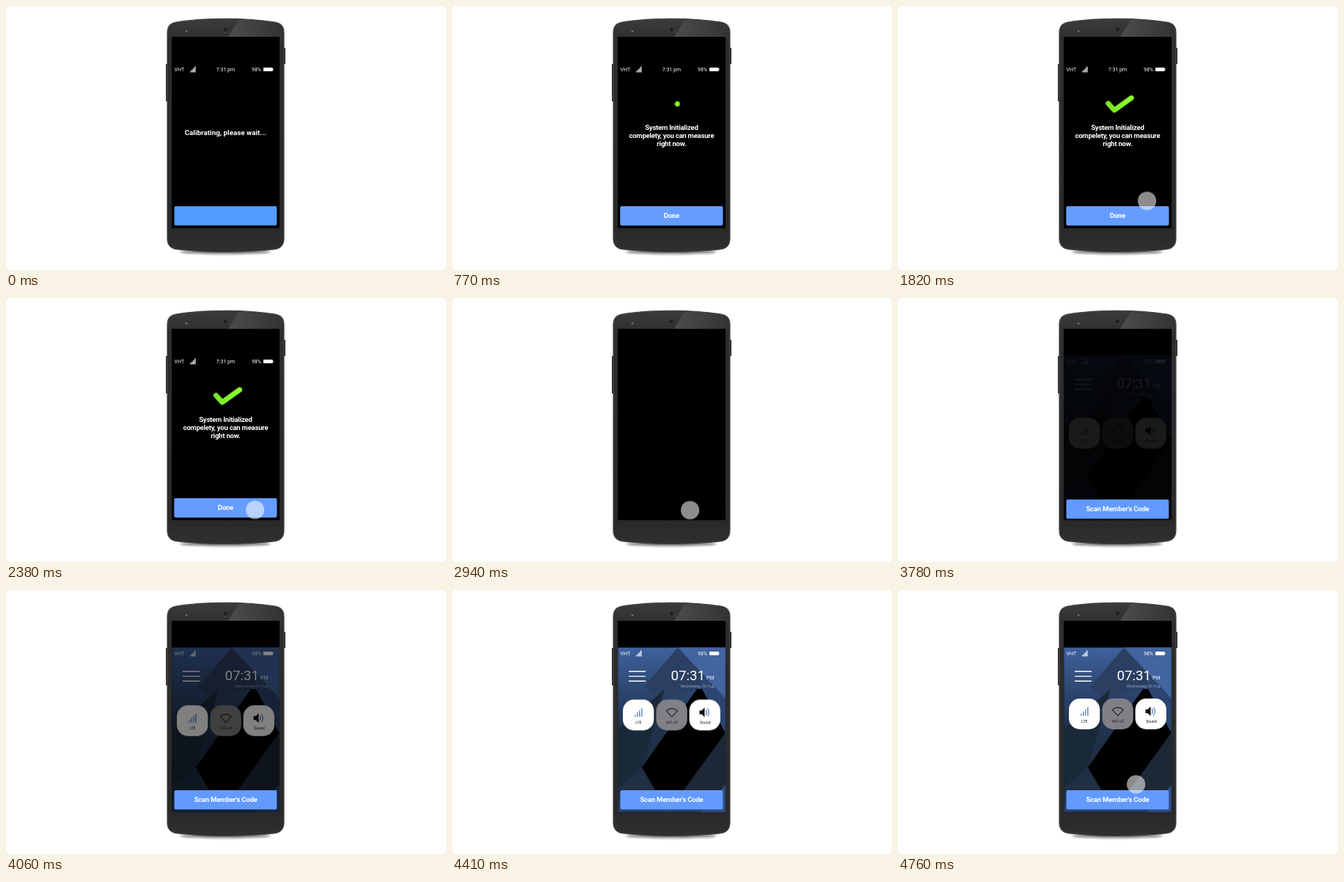
An HTML page that plays this animation: 600 px wide and 360 px high, repeating every 4830 ms.

```html
<!DOCTYPE html>
<html lang="en">
<head>
<meta charset="utf-8">
<title>Phone calibration</title>
<style>
  html, body { margin: 0; width: 100%; height: 100%; overflow: hidden; background: #ccc; }
  svg { display: block; width: 600px; height: 360px; font-family: Roboto, Arial, sans-serif; }
  .bold { font-size: 9.6px; font-weight: 700; letter-spacing: -.25px; }
  .small { font-size: 7px; }
  .label { font-size: 5.2px; fill: #111; }
  .mid { text-anchor: middle; }
  .end { text-anchor: end; }
  .anim { animation: 4830ms linear infinite; }

  .scene1 { animation-name: scene1; animation-timing-function: step-end; }
  @keyframes scene1 { 0% { opacity: 1 } 59.35% { opacity: .5 } 60.8%, 100% { opacity: 0 } }

  .wait { animation-name: wait; animation-timing-function: step-end; }
  @keyframes wait { 0% { opacity: 1 } 8.6% { opacity: .5 } 10.1%, 100% { opacity: 0 } }

  .ready { animation-name: ready; animation-timing-function: step-end; }
  @keyframes ready { 0% { opacity: 0 } 8.6% { opacity: .5 } 10.1%, 100% { opacity: 1 } }

  .dot { animation-name: dot-show, dot-move; animation-timing-function: step-end, ease-in-out; }
  @keyframes dot-show { 0% { opacity: 0 } 15.85% { opacity: 1 } 27.5%, 100% { opacity: 0 } }
  @keyframes dot-move {
    0%, 15.94% { transform: translate(307.3px, 133.5px) }
    18.6% { transform: translate(310.3px, 129px) }
    22.4% { transform: translate(300px, 126.8px) }
    26.1%, 100% { transform: translate(290.5px, 133px) }
  }

  .check { transform-origin: 302px 134px; animation-name: check-show, check-scale; animation-timing-function: step-end, ease-in-out; }
  @keyframes check-show { 0% { opacity: 0 } 27.5%, 100% { opacity: 1 } }
  @keyframes check-scale {
    0%, 31.9% { transform: scale(.92) }
    37.7% { transform: scale(1) }
    45% { transform: scale(1.06) }
    52.2%, 100% { transform: scale(1) }
  }
  .stroke { stroke-dasharray: 1 2; animation-name: stroke; }
  @keyframes stroke { 0%, 26.1% { stroke-dashoffset: 1 } 31.9%, 100% { stroke-dashoffset: 0 } }

  .tap1 { animation-name: tap1; }
  @keyframes tap1 {
    0%, 33.4% { opacity: 0; transform: none }
    37.6% { opacity: 1; transform: none; animation-timing-function: cubic-bezier(.16, .6, .4, 1) }
    52.2%, 100% { opacity: 1; transform: translateY(24.3px) }
  }

  .tap2 { animation-name: tap2; }
  @keyframes tap2 {
    0%, 60.79% { opacity: 0; transform: translateY(24.3px) }
    60.8%, 69.4% { opacity: 1; transform: translateY(24.3px) }
    71%, 80% { opacity: 0; transform: translateY(24.3px) }
    80.01%, 92.5% { opacity: 0; transform: none }
    96%, 100% { opacity: 1; transform: none }
  }

  .home { animation-name: home; }
  @keyframes home { 0%, 76.8% { opacity: 0 } 91.3%, 100% { opacity: 1 } }

  .tiles { animation-name: tiles; }
  @keyframes tiles { 0%, 76.8% { transform: translateY(17px) } 92.7%, 100% { transform: none } }

  .scan { animation-name: scan; }
  @keyframes scan {
    0%, 69.5% { transform: translateY(88px); animation-timing-function: cubic-bezier(.33, .67, .67, 1) }
    79.7%, 100% { transform: none }
  }
  .scan-show { animation-name: scan-show; animation-timing-function: step-end; }
  @keyframes scan-show { 0% { opacity: 0 } 69.5%, 100% { opacity: 1 } }
</style>
</head>
<body>
<svg viewBox="0 0 600 360">
  <defs>
    <linearGradient id="body" x2="0" y2="1">
      <stop offset="0" stop-color="#3b3b3c"/><stop offset=".1" stop-color="#2d2d2e"/>
      <stop offset=".9" stop-color="#29292a"/><stop offset="1" stop-color="#303031"/>
    </linearGradient>
    <linearGradient id="gloss" x2="1" y2="0">
      <stop offset="0" stop-color="#4c4c4d"/><stop offset="1" stop-color="#333334"/>
    </linearGradient>
    <linearGradient id="sky" x2="0" y2="1">
      <stop offset="0" stop-color="#3f619d"/><stop offset=".45" stop-color="#22344f"/>
      <stop offset=".85" stop-color="#1b2939"/><stop offset="1" stop-color="#2a4570"/>
    </linearGradient>
    <linearGradient id="green" x2="1" y2="0">
      <stop offset="0" stop-color="#78e62a"/><stop offset="1" stop-color="#8cff2c"/>
    </linearGradient>
    <filter id="blur" x="-20%" y="-200%" width="140%" height="500%"><feGaussianBlur stdDeviation="1.6"/></filter>
    <g id="status" fill="#fff">
      <text class="small" x="229.6" y="89">VHT</text>
      <path d="M251.2 88.5h1.3v2h-1.3zM253.2 86.8h1.3v3.7h-1.3zM255.1 84.8h1.3v5.7h-1.3zM257.1 82.5h1.3v8h-1.3z"/>
      <text class="small end" x="348" y="89">98%</text>
      <path d="M351 84h12.5v1.5h1v2h-1V89H351z"/>
    </g>
    <rect id="button" x="229.5" y="273" width="139.8" height="26.2" rx="2"/>
    <rect id="tile" y="148" width="42.3" height="42" rx="15"/>
    <circle id="finger" r="12.6" cy="265" fill="#fff" fill-opacity=".55"/>
  </defs>

  <rect width="600" height="360" rx="3" fill="#fff"/>

  <g id="phone">
    <ellipse cx="299" cy="335.5" rx="62" ry="3" fill="#000" opacity=".5" filter="url(#blur)"/>
    <path d="M218 79h3v51h-3zM378 57h3v22h-3z" fill="#2b2b2d"/>
    <path d="M220 36Q220 24 232 22Q262 17.3 299.5 17.3T367 22Q379 24 379 36V317Q379 329.5 367 331.7Q335 335.5 299.5 335.5T232 331.7Q220 329.5 220 317Z"
      fill="url(#body)" stroke="#454546" stroke-width="1.2"/>
    <path d="M317 19Q346 19.5 366 23.3Q377.5 25 377.5 36V42H303Z" fill="url(#gloss)"/>
    <circle cx="299.3" cy="32.2" r="4" fill="#2b2b2d" stroke="#454548" stroke-width=".8"/>
    <circle cx="299.3" cy="32.2" r="1.6" fill="#1b1b20"/>
    <circle cx="246" cy="34.5" r="1.6" fill="#6a6a6c"/>
    <rect x="226" y="42" width="147" height="261" fill="#000"/>
  </g>

  <g class="anim scene1">
    <use href="#status"/>
    <text class="small mid" x="299.5" y="89" fill="#fff">7:31 pm</text>
    <use href="#button" fill="#4f9bff"/>
    <g class="anim wait">
      <text class="mid" x="299.3" y="176.3" font-size="9.8" font-weight="700" fill="#fff">Calibrating, please wait...</text>
    </g>
    <g class="anim ready">
      <use href="#button" fill="#659cff"/>
      <g class="bold mid" fill="#fff">
        <text x="299.4" y="168.6">System Initialized</text>
        <text x="299.4" y="180">compelety, you can measure</text>
        <text x="299.4" y="191.4">right now.</text>
        <text x="299.3" y="288.6">Done</text>
      </g>
    </g>
    <circle class="anim dot" r="3.5" fill="#8cff2c"/>
    <g class="anim check">
      <path class="anim stroke" pathLength="1" d="M286.6 132.8L295 142L318.3 125.2" fill="none" stroke="url(#green)"
        stroke-width="6.8" stroke-linecap="round" stroke-linejoin="round"/>
    </g>
    <g class="anim tap1"><use href="#finger" x="339.6"/></g>
  </g>

  <g class="anim home">
    <path d="M226.3 78.5H372.7V302.7H226.3z" fill="url(#sky)"/>
    <path d="M308 78.5H372.7V148z" fill="#42649f"/>
    <path d="M308 78.5L345 118L334 135L284 150L262 132z" fill="#2a3f61"/>
    <path d="M345 118L372.7 148V195L340 133z" fill="#2c4570"/>
    <path d="M226.3 190L290 135L259 242L226.3 270z" fill="#1a2939"/>
    <path d="M259 242L278 274H226.3V270z" fill="#1f2f44"/>
    <path d="M372.7 195L315 274H372.7z" fill="#1c2836"/>
    <path d="M372.7 266V302.7H340z" fill="#2f4f85"/>
    <path d="M334 135H341L372.7 195L315 274H278L259 242z" fill="#000"/>
    <use href="#status"/>
    <path d="M241 111h23M241 117.6h23M241 124.2h23" stroke="#fff" stroke-width="1.4"/>
    <g fill="#fff">
      <text class="end" x="345.2" y="122.5" font-size="18.8">07:31</text>
      <text class="end" x="357.6" y="122" font-size="7">PM</text>
      <text class="end" x="357.6" y="133" font-size="5.4" font-weight="300" opacity=".7">Wednesday, 30 Aug</text>
    </g>
    <g class="anim tiles">
      <use href="#tile" x="233" fill="#fff"/>
      <use href="#tile" x="278.5" fill="#808086"/>
      <use href="#tile" x="323.6" fill="#fff"/>
      <path d="M249 168.5h1.6v3H249zM252 165.5h1.6v6H252zM255 162.5h1.6v9H255zM258 159.5h1.6v12H258z" fill="#6a92d4"/>
      <path d="M292.2 163.4Q299.8 156.8 307.4 163.4L299.8 171.4z" fill="none" stroke="#222" stroke-width="1.1" stroke-linejoin="round"/>
      <path d="M337.5 162.7h3l4-4v13.4l-4-4h-3z" fill="#111"/>
      <path d="M346.3 162.2q2 3.2 0 6.4M348.6 160.2q3.4 5.2 0 10.4" fill="none" stroke="#4d78b8" stroke-width="1.1" stroke-linecap="round"/>
      <g class="label mid">
        <text x="254.4" y="181.4">LTE</text>
        <text x="299.8" y="181.4" opacity=".75">Wifi-off</text>
        <text x="345.3" y="181.4">Sound</text>
      </g>
    </g>
  </g>
  <g class="anim scan-show">
    <g class="anim scan">
      <use href="#button" fill="#629aff"/>
      <text class="bold mid" x="299.5" y="288.6" fill="#fff">Scan Member's Code</text>
    </g>
  </g>
  <g class="anim tap2"><use href="#finger" x="324.6"/></g>
</svg>
</body>
</html>
```
